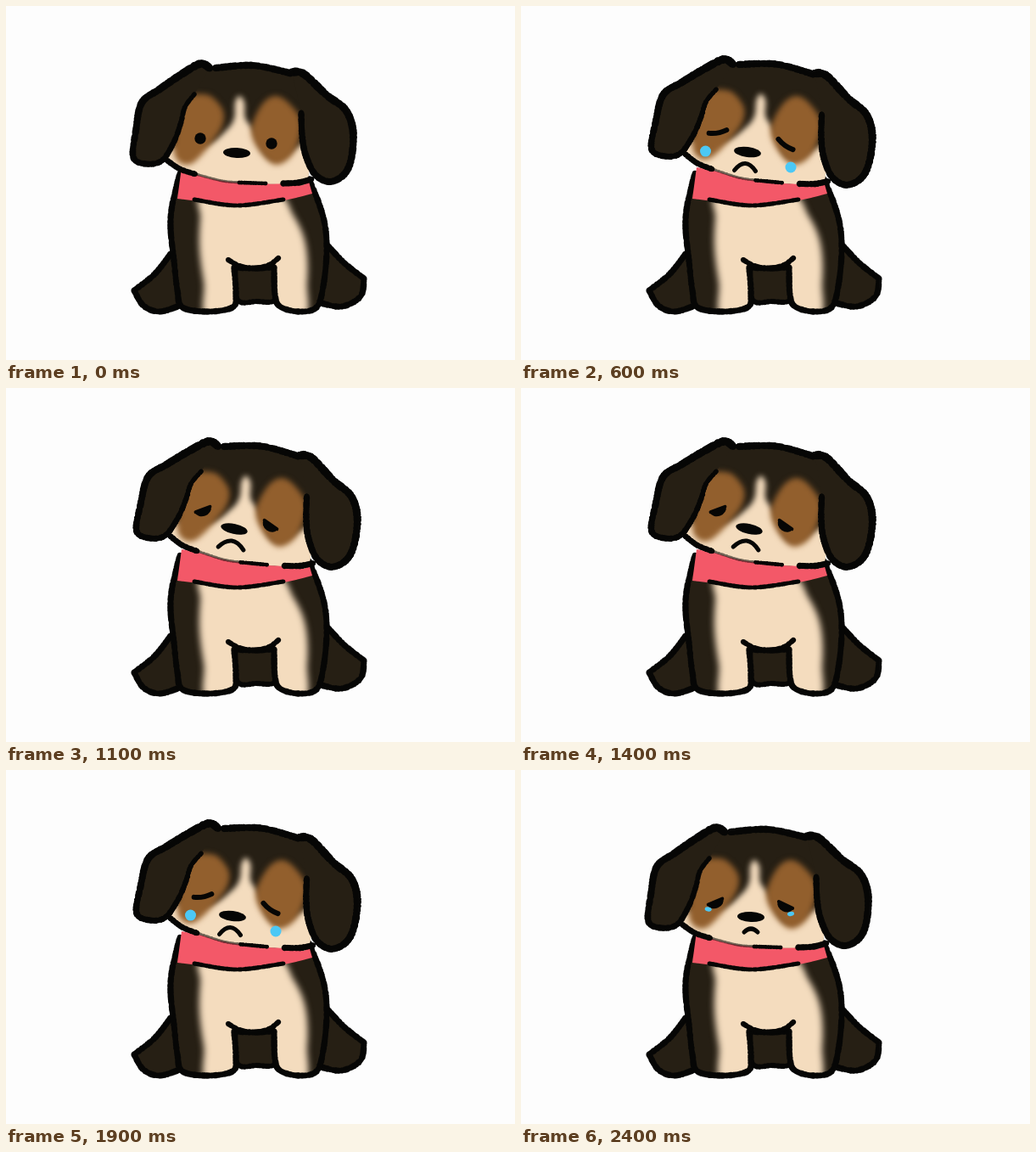
An HTML page with a canvas that plays this animation: 600x417 px, repeating every 2500 ms.

```html
<!DOCTYPE html>
<html lang="en">
<head>
<meta charset="utf-8">
<title>Sad puppy</title>
<style>
html, body { margin: 0; width: 100%; height: 100%; overflow: hidden; background: #fdfdfd; }
canvas { display: block; width: 600px; height: 417px; }
</style>
</head>
<body>
<canvas id="stage" width="600" height="417"></canvas>
<script>
const W = 600, H = 417, SCALE = 2;
const TILT = 0.06, PIVOT = [320, 235];
const INK = '#060605', FUR = '#261f14', BROWN = '#925f2d', CREAM = '#f4dcbe', PINK = '#f35868', TEAR = '#4cc8f5';
const stage = document.getElementById('stage').getContext('2d');

let seed = 7;
const random = () => (seed = (seed * 16807) % 2147483647) / 2147483647;

// Catmull-Rom curve through "x,y x,y ..."; a doubled point makes a corner.
function curve(text, closed) {
  const p = text.split(' ').map(s => s.split(',').map(Number));
  const n = p.length, out = [];
  const at = i => closed ? p[(i + n) % n] : p[Math.max(0, Math.min(n - 1, i))];
  for (let i = 0; i < (closed ? n : n - 1); i++) {
    const [a, b, c, d] = [at(i - 1), at(i), at(i + 1), at(i + 2)];
    const steps = Math.max(1, Math.ceil(Math.hypot(c[0] - b[0], c[1] - b[1])));
    for (let s = 0; s < steps; s++) {
      const t = s / steps;
      out.push([0, 1].map(k => b[k] + 0.5 * t * (c[k] - a[k] +
        t * (2 * a[k] - 5 * b[k] + 4 * c[k] - d[k] + t * (3 * (b[k] - c[k]) + d[k] - a[k])))));
    }
  }
  out.push(at(closed ? 0 : n - 1));
  return out;
}

function trace(g, points) {
  g.beginPath();
  points.forEach(([x, y]) => g.lineTo(x, y));
}

function fill(g, points, color, blur = 0) {
  g.filter = blur ? `blur(${blur * SCALE}px)` : 'none';
  g.fillStyle = color;
  trace(g, points);
  g.fill();
  g.filter = 'none';
}

// Slightly ragged brush line, tapering from one width to another.
function brush(g, text, from, to = from) {
  const points = curve(text);
  g.fillStyle = INK;
  g.beginPath();
  points.forEach(([x, y], i) => {
    const r = (from + (to - from) * i / points.length) / 2 * (0.9 + 0.2 * random());
    g.moveTo(x + r, y);
    g.arc(x, y, r, 0, 7);
  });
  g.fill();
}

function inked(g, text, from, to) {
  fill(g, curve(text), FUR);
  brush(g, text, from, to);
}

function clipped(g, points, paint) {
  g.save();
  trace(g, points);
  g.clip();
  paint();
  g.restore();
}

function layer(paint) {
  const c = document.createElement('canvas');
  c.width = W * SCALE;
  c.height = H * SCALE;
  const g = c.getContext('2d');
  g.scale(SCALE, SCALE);
  paint(g);
  return c;
}

const body = layer(g => {
  const torso = '205,197 196,234 194,262 198,300 202,335 208,355 238,360 267,355 271,340 269,308 269,308 292,309 ' +
    '316,308 316,308 317,340 323,354 345,360 366,355 374,330 378,290 376,258 368,230 357,204';
  inked(g, '194,292 175,316 151,335 151,335 162,353 181,360 205,353', 7);
  inked(g, '380,283 399,303 422,321 422,321 418,342 396,354 371,350', 7);
  inked(g, '270,308 273,346 295,348 318,345 316,308', 6);
  fill(g, curve(torso), FUR);
  clipped(g, curve(torso), () => fill(g,
    curve('233,220 229,250 228,285 233,325 243,375 345,375 355,325 353,280 339,247 316,220', true), CREAM, 4));
  brush(g, torso, 7);
  brush(g, '262,299 275,306 292,309 310,305 321,297', 6);
  fill(g, curve('207,190 207,190 202,227 202,227 228,230 275,235 327,229 361,221 361,221 355,200 355,200 285,203', true), PINK);
  brush(g, '222,228 272,235 327,228', 5);
});

const head = layer(g => {
  const skull = curve('212,90 234,73 290,70 336,79 352,120 356,203 330,209 290,209 255,206 223,198 190,183 206,145', true);
  fill(g, skull, FUR);
  clipped(g, skull, () => {
    fill(g, curve('275,106 281,114 282,132 292,146 315,180 364,160 375,230 180,230 185,172 235,164 260,146 269,132 270,114', true), CREAM, 3.5);
    fill(g, curve('234,104 250,114 257,130 249,152 218,186 198,172 209,113', true), BROWN, 3.5);
    fill(g, curve('317,106 334,115 348,138 339,173 318,187 298,170 289,146 301,117', true), BROWN, 3.5);
  });
  inked(g, '240,73 229,68 209,79 181,98 160,114 153,147 150,178 165,186 184,182 198,160 206,138 211,119 222,104', 9.5, 5.5);
  inked(g, '337,78 351,80 378,105 400,122 409,147 407,180 398,199 381,207 364,198 353,175 349,152 348,126', 9.5, 7);
  brush(g, '190,182 205,192 223,198', 6.5);
  brush(g, '247,73 291,70 335,79', 8);
  brush(g, '327,209 345,208 360,204', 7);
  brush(g, '275,208 306,209', 4.5);
  g.globalAlpha = 0.55;
  brush(g, '224,198 255,206 278,208', 3);
  g.globalAlpha = 1;
});

function turn(angle, [x, y] = PIVOT) {
  stage.translate(x, y);
  stage.rotate(angle);
  stage.translate(-x, -y);
}

function oval(x, y, rx, ry, color = INK, angle = 0, end = 7) {
  stage.fillStyle = color;
  stage.beginPath();
  stage.ellipse(x, y, rx, ry, angle, 0, end);
  stage.fill();
}

// Bow of half-width w bending by h (up when positive).
function bow(x, y, w, h, angle, width) {
  stage.save();
  turn(angle, [x, y]);
  stage.beginPath();
  stage.moveTo(x - w, y);
  stage.quadraticCurveTo(x, y - 2 * h, x + w, y);
  stage.strokeStyle = INK;
  stage.lineWidth = width;
  stage.lineCap = 'round';
  stage.stroke();
  stage.restore();
}

const dot = (x, y) => oval(x, y, 6.7, 6.7);

function droopy(x, y, angle) {
  bow(x, y, 9, 0, angle, 4);
  stage.save();
  turn(angle, [x, y]);
  oval(x, y, 10, 8, INK, 0, Math.PI);
  stage.restore();
}

const shut = (x, y, angle) => bow(x, y, 10.5, -1.5, angle, 6);

// Eyes as [x, y, angle], nose likewise, mouth as [x, y, half-width, bend, angle].
const faces = {
  calm: { tilt: 0, eye: dot, eyes: [[229, 156], [313, 162]], nose: [272, 173, 0.04] },
  sad: { tilt: 0, eye: droopy, eyes: [[229, 155, -0.4], [312, 159, 0.45]], nose: [271, 173, 0.04], mouth: [271, 191, 8, 4, 0] },
  weep: { tilt: 1, eye: shut, eyes: [[232, 148, -0.18], [312, 163, 0.62]], nose: [267, 172, 0.13], mouth: [264, 194, 12.5, 8.5, 0.04] },
  gloom: { tilt: 1, eye: droopy, eyes: [[232, 143, -0.36], [312, 161, 0.62]], nose: [269, 166, 0.22], mouth: [265, 189, 15, 9, 0.13] }
};

function mood(k) {
  if (k === 0) return faces.calm;
  if (k < 4 || k === 10) return faces.sad;
  return k < 8 ? faces.weep : faces.gloom;
}

// Tears swell under the eyes, then round off and drop.
function drawTears(k) {
  const fall = (k - 1) ** 2;
  const r = (k === 6 ? 4.5 : 6.5) * Math.min(1, 0.3 + k / 3);
  const ry = r * Math.min(1, 0.5 + k / 10);
  const slant = Math.max(0, 0.25 - k / 20);
  oval(221.5 - 0.8 * k, 164 + 0.44 * fall, r, ry, TEAR, slant);
  oval(318, 169.5 + 1.28 * fall, r, ry, TEAR, -slant);
}

function drawFace(face) {
  face.eyes.forEach(e => face.eye(...e));
  const [x, y, angle] = face.nose;
  oval(x, y, 16, 6, INK, angle);
  if (face.mouth) bow(...face.mouth, 5);
}

function draw(ms) {
  // Eight drawings a second shown on a 100 ms grid, played there and back.
  const t = ms % 2500, beat = Math.floor(t % 500 / 100);
  const step = 4 * Math.floor(t / 500) + beat - (beat > 1 ? 1 : 0);
  const k = 10 - Math.abs(10 - step);
  const lean = Math.max(0, Math.min(2, Math.floor(k / 2) - 1, 10 - k));
  const face = mood(k);
  stage.fillStyle = '#fdfdfd';
  stage.fillRect(0, 0, W, H);
  stage.drawImage(body, 0, 0, W, H);
  stage.save();
  turn(lean * TILT);
  stage.drawImage(head, 0, 0, W, H);
  turn(-face.tilt * TILT);
  drawFace(face);
  if (k > 0 && k < 7) drawTears(k);
  stage.restore();
}

const start = performance.now();
function tick() {
  draw(performance.now() - start);
  requestAnimationFrame(tick);
}
tick();
</script>
</body>
</html>
```
